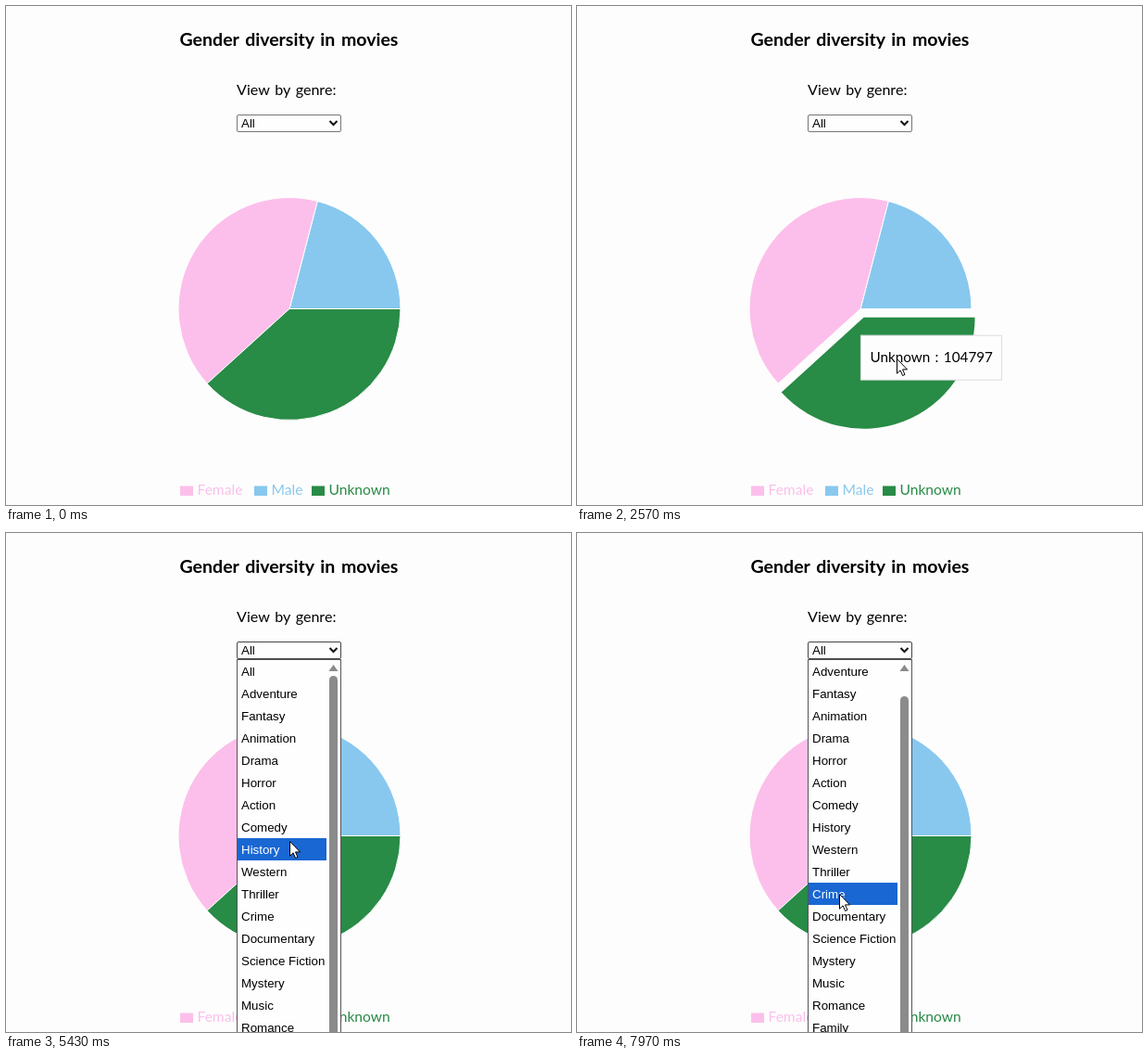
An HTML page that plays this animation: 610x538 px, repeating every 8 s.

```html
<!DOCTYPE html>
<html lang="en">
<head>
<meta charset="utf-8">
<title>Gender diversity in movies</title>
<style>
  html, body { margin: 0; width: 100%; height: 100%; overflow: hidden; background: #fdfdfd; }
  svg { display: block; width: 610px; height: 538px; }
  text { font: 15.6px Lato, sans-serif; word-spacing: .1em; white-space: pre; }
  .title { font-size: 19.55px; font-weight: 700; }
  .lead { font-size: 16.1px; }
  #tip text { font-size: 15.25px; }
  .ui text { font: 13.33px "Liberation Sans", Arial, sans-serif; word-spacing: 0; }
</style>
</head>
<body>
<svg viewBox="0 0 610 538" xmlns="http://www.w3.org/2000/svg">
  <text class="title" x="305.5" y="43" text-anchor="middle">Gender diversity in movies</text>
  <text class="lead" x="249" y="96">View by genre:</text>
  <g id="pie"></g>
  <g id="legend"></g>
  <g id="tip">
    <rect x=".5" y=".5" height="48" fill="#fdfdfd" stroke="#dcdce0"/>
    <text x="10.5" y="29.5"></text>
  </g>
  <g class="ui">
    <rect id="box" x="249.5" y="117.5" width="112" height="18" rx="1.5" fill="#fefefe" stroke="#767676"/>
    <text x="254" y="131">All</text>
    <path d="M349.5 124l4 4 4-4" fill="none" stroke="#111" stroke-width="2"/>
    <g id="list">
      <rect x="249.5" y="136.5" width="112" height="420" fill="#fefefe" stroke="#555"/>
      <g clip-path="url(#view)">
        <g id="rows"><rect id="mark" x="250" width="96" height="24" fill="#1967d2"/></g>
      </g>
      <path d="M348.5 149l5-7 5 7z" fill="#8b8b8b"/>
      <rect id="thumb" x="349" width="9" height="460" rx="4.5" fill="#8b8b8b"/>
    </g>
  </g>
  <path id="cursor" d="M.5 .5V16.2L4.1 12.8 6.6 18.5 9 17.4 6.5 11.9H11.5Z" fill="#fff" stroke="#000"/>
  <clipPath id="view"><rect x="250" y="137" width="97" height="401"/></clipPath>
</svg>
<script>
const LOOP = 8000, CX = 306, CY = 326.5, R = 120, TAU = 2 * Math.PI;
const ROW = 24, LIST_TOP = 137, OPEN = 4300, SCROLL = 5700, REFRESH = 80;
const $ = id => document.getElementById(id);

const slices = [
  { name: 'Male', value: 57343, fill: '#88c8ef', key: 268, tip: 112 },
  { name: 'Female', value: 111650, fill: '#fcbfeb', key: 188, tip: 139 },
  { name: 'Unknown', value: 104797, fill: '#288b46', key: 330, tip: 152 }
];
const genres = ['All', 'Adventure', 'Fantasy', 'Animation', 'Drama', 'Horror', 'Action', 'Comedy',
  'History', 'Western', 'Thriller', 'Crime', 'Documentary', 'Science Fiction', 'Mystery', 'Music',
  'Romance', 'Family'];

// pointer moves, each from where the last one ended
const moves = [
  { from: 100, to: 760, x: 335, y: 268 },
  { from: 1120, to: 1500, x: 243, y: 280 },
  { from: 2290, to: 2570, x: 345, y: 380 },
  { from: 3000, to: 3400, x: 416, y: 117 },
  { from: 3700, to: 4250, x: 354, y: 122 },
  { from: 5050, to: 5680, x: 281, y: 443 },
  { from: 6230, to: 7900, x: 283, y: 389 }
];

function add(parent, tag, attrs, text) {
  const el = document.createElementNS('http://www.w3.org/2000/svg', tag);
  for (const k in attrs) el.setAttribute(k, attrs[k]);
  if (text) el.textContent = text;
  return parent.appendChild(el);
}
const polar = (a, r) => [CX + r * Math.cos(a), CY - r * Math.sin(a)];
const clamp = v => Math.max(0, Math.min(1, v));
const mix = (a, b, k) => a + (b - a) * k;
const smooth = u => u * u * (3 - 2 * u);
const place = (el, x, y) => el.setAttribute('transform', `translate(${x} ${y})`);
const show = (el, on) => el.setAttribute('visibility', on ? 'visible' : 'hidden');

// cubic-bezier(.25, .1, .25, 1)
function ease(x) {
  if (x <= 0 || x >= 1) return clamp(x);
  const bez = (p, q, s) => 3 * p * s * (1 - s) ** 2 + 3 * q * s * s * (1 - s) + s ** 3;
  let lo = 0, hi = 1;
  for (let i = 0; i < 24; i++) {
    const mid = (lo + hi) / 2;
    if (bez(.25, .25, mid) < x) lo = mid; else hi = mid;
  }
  return bez(.1, 1, lo);
}

function pointer(t) {
  let x = 606, y = -20;
  for (const m of moves) {
    const k = smooth(clamp((t - m.from) / (m.to - m.from)));
    x = mix(x, m.x, k);
    y = mix(y, m.y, k);
  }
  return [x, y];
}

const total = slices.reduce((sum, s) => sum + s.value, 0);
let angle = 0;
for (const s of slices) {
  s.end = angle + s.value / total * TAU;
  const mid = (angle + s.end) / 2;
  s.el = add($('pie'), 'path', {
    d: `M${CX} ${CY}L${polar(angle, R)}A${R} ${R} 0 0 0 ${polar(s.end, R)}Z`, fill: s.fill
  });
  s.shift = [10 * Math.cos(mid), -10 * Math.sin(mid)];
  s.spot = polar(mid, R / 2).map(v => v + 10);
  add($('legend'), 'rect', { x: s.key, y: 517.5, width: 14, height: 10.5, fill: s.fill });
  add($('legend'), 'text', { x: s.key + 18.5, y: 527, fill: s.fill }, s.name);
  angle = s.end;
}
const labels = genres.map((g, i) => add($('rows'), 'text', { x: 254, y: LIST_TOP + ROW * i + 17 }, g));
const [tipBox, tipText] = $('tip').children;

function sliceAt([x, y]) {
  if (Math.hypot(x - CX, y - CY) > R) return null;
  const a = (Math.atan2(CY - y, x - CX) + TAU) % TAU;
  return slices.find(s => a < s.end);
}

// when the pointer enters or leaves a slice
const hovers = [{ start: 0, slice: null }];
for (let t = 0; t < OPEN; t += 5) {
  const slice = sliceAt(pointer(t)), last = hovers[hovers.length - 1];
  if (slice !== last.slice) hovers.push({ start: t, slice, before: last.slice });
}

function drawPie(t) {
  const { start, slice, before } = hovers.filter(h => h.start <= t).pop();
  for (const s of slices) {
    const active = s === slice;
    place(s.el, ...(active ? s.shift : [0, 0]));
    s.el.setAttribute('stroke', active ? 'none' : '#fff');
  }
  show($('tip'), slice);
  if (!slice) return;
  const from = before ? before.spot : [6, 139], k = ease((t - start) / 400);
  place($('tip'), ...from.map((v, i) => mix(v, slice.spot[i], k)));
  tipBox.setAttribute('width', slice.tip);
  tipText.textContent = `${slice.name} : ${slice.value}`;
}

function drawList(t) {
  const open = t >= OPEN;
  show($('list'), open);
  $('box').setAttribute('stroke', open ? '#444' : '#767676');
  if (!open) return;
  const off = t >= SCROLL ? ROW : 0;
  // the highlight notices the scroll a moment late
  const seen = t >= SCROLL + REFRESH ? ROW : 0;
  const row = Math.max(0, Math.floor((pointer(t)[1] + seen - LIST_TOP) / ROW));
  place($('rows'), 0, -off);
  $('mark').setAttribute('y', LIST_TOP + ROW * row);
  labels.forEach((el, i) => el.setAttribute('fill', i === row ? '#fff' : '#000'));
  $('thumb').setAttribute('y', off ? 176 : 154);
}

function draw(t) {
  drawPie(t);
  drawList(t);
  place($('cursor'), ...pointer(t).map(Math.round));
}

const begin = performance.now();
function tick() {
  draw((performance.now() - begin) % LOOP);
  requestAnimationFrame(tick);
}
draw(0);
requestAnimationFrame(tick);
</script>
</body>
</html>
```
